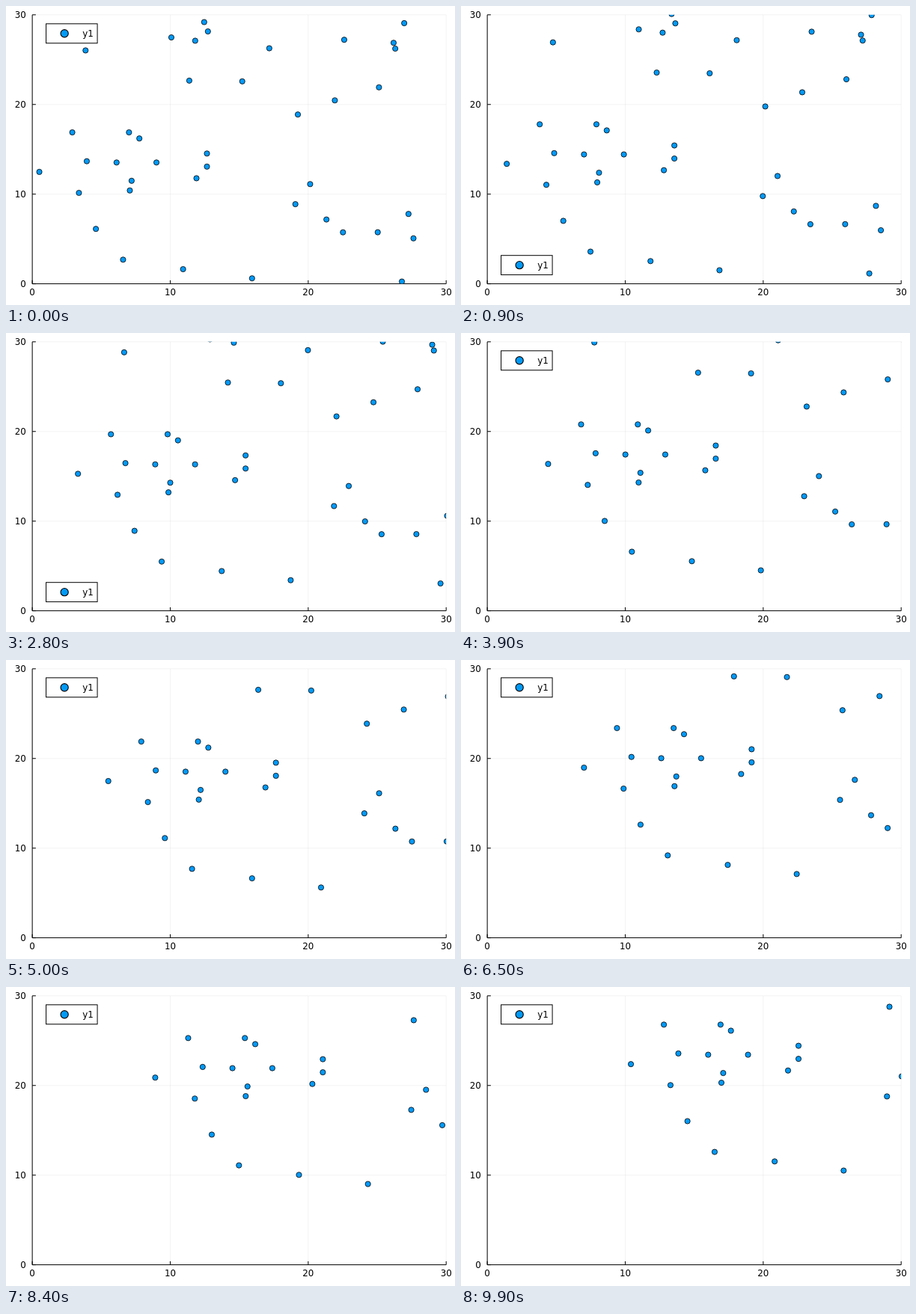
Write an HTML page that moves like this. It is 600 px wide and 400 px high and loops after 10000 ms.

```html
<!DOCTYPE html>
<html lang="en">
<head>
<meta charset="utf-8">
<title>Drifting scatter plot</title>
<style>
  html, body { margin: 0; width: 100%; height: 100%; overflow: hidden; background: #fff; }
  svg { display: block; }
  text { font: 11.85px "DejaVu Sans", sans-serif; }
  circle { fill: #009af9; stroke: #000; }
</style>
</head>
<body>
<svg width="600" height="400" viewBox="0 0 600 400">
  <clipPath id="area"><rect x="35.13" y="11.81" width="553.06" height="359.8"/></clipPath>
  <path id="grid" fill="none" stroke="#000" stroke-opacity=".1" stroke-width=".5"/>
  <path id="axes" fill="none" stroke="#000"/>
  <g id="labels"></g>
  <g clip-path="url(#area)"><g id="dots" stroke-width=".8"></g></g>
  <g id="legend">
    <rect width="68.5" height="25.92" fill="#fff" stroke="#000"/>
    <circle cx="24.58" cy="12.96" r="5.12" stroke-width="1.14"/>
    <text x="48.8" y="17.28">y1</text>
  </g>
</svg>
<script>
const LEFT = 35.13, RIGHT = 588.19, TOP = 11.81, BOTTOM = 371.61;
const MAX = 30, STEP_MS = 100, STEPS = 100, SPEED = 0.1;
const UNIT_X = (RIGHT - LEFT) / MAX, UNIT_Y = (BOTTOM - TOP) / MAX;

// Starting points in axis units
const POINTS = [
  [.51, 12.48], [2.9, 16.89], [3.86, 26.03], [3.95, 13.67], [3.38, 10.14],
  [4.61, 6.12], [6.11, 13.53], [6.58, 2.69], [7.01, 16.89], [7.07, 10.41],
  [7.2, 11.49], [7.76, 16.21], [9, 13.53], [10.08, 27.48], [10.93, 1.63],
  [11.38, 22.66], [11.81, 27.11], [12.46, 29.19], [12.73, 28.15], [11.9, 11.77],
  [12.66, 14.53], [12.66, 13.07], [15.22, 22.58], [15.93, .61], [17.18, 26.27],
  [19.25, 18.88], [19.07, 8.88], [20.14, 11.12], [21.32, 7.17], [21.93, 20.46],
  [22.52, 5.74], [22.61, 27.22], [25.13, 21.91], [25.04, 5.75], [26.19, 26.88],
  [26.31, 26.23], [26.96, 29.07], [27.27, 7.79], [27.63, 5.07], [26.79, .25]
];
// Legend corners in order of preference: [right, top]
const CORNERS = [[1, 1], [0, 1], [1, 0], [0, 0]];

const $ = id => document.getElementById(id);
const px = x => LEFT + x * UNIT_X;
const py = y => BOTTOM - y * UNIT_Y;
const label = (text, x, y, anchor) =>
  `<text x="${x}" y="${y}" text-anchor="${anchor}">${text}</text>`;
const move = (id, x, y) => $(id).setAttribute("transform", `translate(${x} ${y})`);

function drawAxes() {
  let grid = "", labels = "", axes = `M${LEFT} ${TOP}V${BOTTOM}H${RIGHT}`;
  for (let v = 0; v <= MAX; v += 10) {
    const x = px(v), y = py(v);
    grid += `M${x} ${TOP}V${BOTTOM}M${LEFT} ${y}H${RIGHT}`;
    axes += `M${x} ${BOTTOM}v-4.72M${LEFT} ${y}h4.72`;
    labels += label(v, x, 387.2, "middle") + label(v, 26.9, y + 4.32, "end");
  }
  $("grid").setAttribute("d", grid);
  $("axes").setAttribute("d", axes);
  $("labels").innerHTML = labels;
}

// Points near a corner count more; only its quarter-size square matters
function crowding([right, top], shift) {
  let sum = 0;
  for (const [x, y] of POINTS) {
    const dx = Math.abs((x + shift) / MAX - right);
    const dy = Math.abs((y + shift) / MAX - top);
    const inside = x + shift <= MAX && y + shift <= MAX;
    if (inside && dx <= 0.25 && dy <= 0.25) sum += 1 / (1 + 100 * (dx * dx + dy * dy));
  }
  return sum;
}

function placeLegend(shift) {
  const scores = CORNERS.map(corner => crowding(corner, shift));
  const [right, top] = CORNERS[scores.indexOf(Math.min(...scores))];
  move("legend", right ? px(MAX - 1) - 68.5 : px(1), top ? py(MAX - 1) : py(1) - 25.92);
}

function draw(now) {
  const shift = Math.floor(now / STEP_MS) % STEPS * SPEED;
  move("dots", shift * UNIT_X, -shift * UNIT_Y);
  placeLegend(shift);
  requestAnimationFrame(draw);
}

drawAxes();
$("dots").innerHTML = POINTS.map(([x, y]) => `<circle cx="${px(x)}" cy="${py(y)}" r="3.6"/>`).join("");
draw(0);
</script>
</body>
</html>
```
